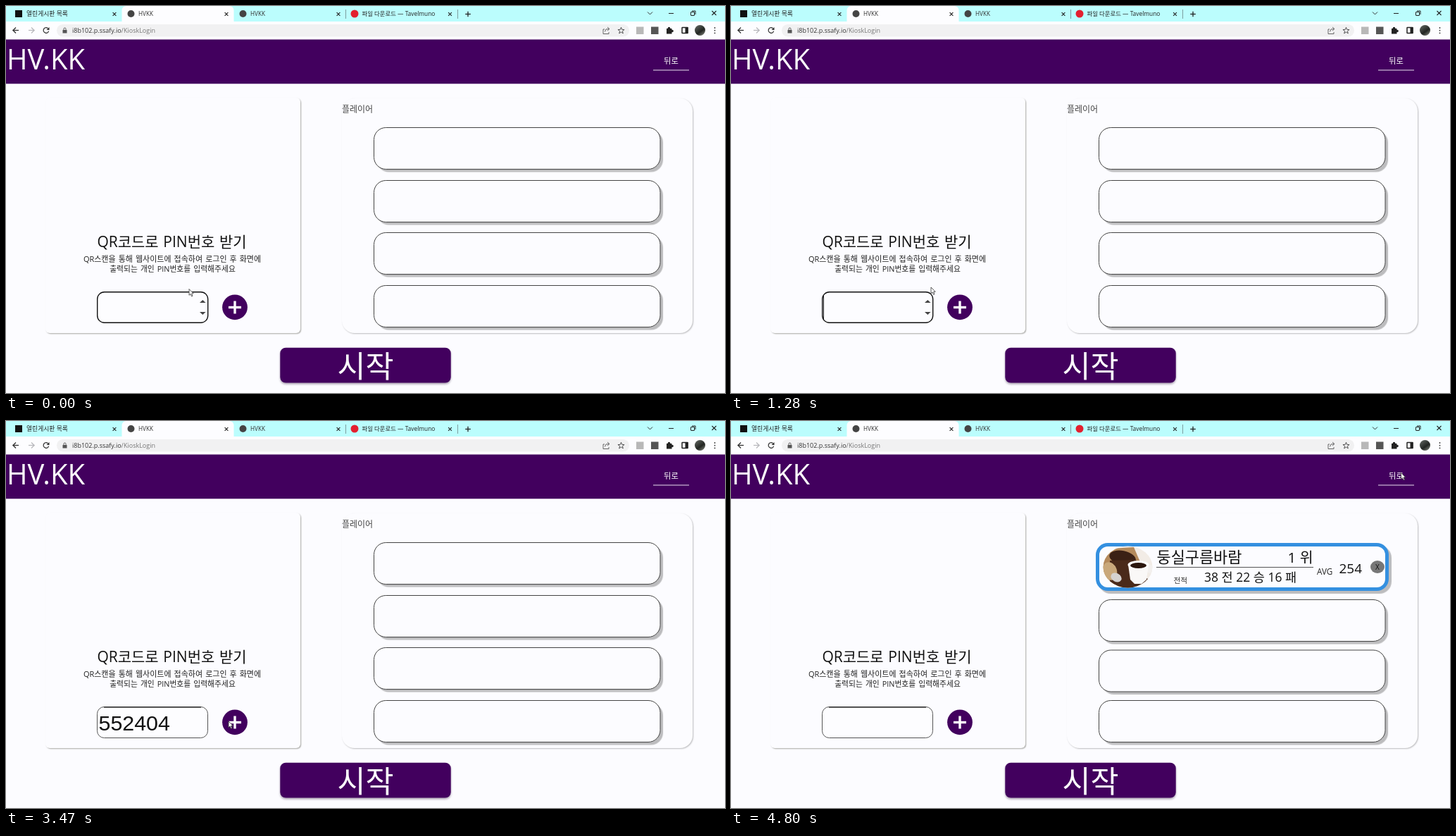
Recreate the animation shown at these times as an HTML page with a canvas. Size 1021 by 549 pixels, loop 4920 ms.

```html
<!DOCTYPE html>
<html lang="ko">
<head>
<meta charset="utf-8">
<title>Kiosk login</title>
<style>
html, body { margin: 0; width: 100%; height: 100%; overflow: hidden; background: #fcfcff; }
canvas { display: block; }
</style>
</head>
<body>
<canvas id="stage" width="1021" height="549"></canvas>
<script>
const ctx = document.getElementById('stage').getContext('2d');
const LOOP = 4920;
const SANS = '"Open Sans", "Noto Sans CJK KR", "Noto Sans CJK", sans-serif';
const PAGE = '#fcfcff', PURPLE = '#42005e', INK = '#111';

const PIN = '552404';
const TYPE_START = 2300, TYPE_STEP = 120;
const PRESS = 3420, ADDED = 3610;
const BLINK = 530, BLINK_START = 70;

// pointer path: time, x, y
const PATH = [
  [0, 260, 401.5], [120, 260, 403], [460, 261.5, 449], [700, 262, 449],
  [1240, 284, 399], [1330, 284, 399], [1830, 126.5, 419.5], [2960, 126.5, 419.5],
  [3380, 316, 426], [3690, 316, 426], [4170, 980, 79.5], [4330, 980, 79.5],
  [4760, 951.5, 73.5], [LOOP, 951.5, 73.5]
];

function rect(x, y, w, h, color) {
  ctx.fillStyle = color;
  ctx.fillRect(x, y, w, h);
}

function box(x, y, w, h, r, fill, stroke, width = 1) {
  ctx.beginPath();
  ctx.roundRect(x, y, w, h, r);
  if (fill) { ctx.fillStyle = fill; ctx.fill(); }
  if (stroke) { ctx.strokeStyle = stroke; ctx.lineWidth = width; ctx.stroke(); }
}

function oval(x, y, rx, ry, color, turn = 0) {
  ctx.beginPath();
  ctx.ellipse(x, y, rx, ry, turn, 0, Math.PI * 2);
  ctx.fillStyle = color;
  ctx.fill();
}

function line(points, color, width = 1) {
  ctx.beginPath();
  for (let i = 0; i < points.length; i += 2) ctx.lineTo(points[i], points[i + 1]);
  ctx.strokeStyle = color;
  ctx.lineWidth = width;
  ctx.stroke();
}

function poly(points, color) {
  ctx.beginPath();
  for (let i = 0; i < points.length; i += 2) ctx.lineTo(points[i], points[i + 1]);
  ctx.closePath();
  ctx.fillStyle = color;
  ctx.fill();
}

function text(str, x, y, size, color = INK, align = 'left', family = SANS) {
  ctx.font = size + 'px ' + family;
  ctx.textAlign = align;
  ctx.fillStyle = color;
  ctx.fillText(str, x, y);
}

function shadow(color, dx, dy, blur, draw) {
  ctx.save();
  ctx.shadowColor = color;
  ctx.shadowOffsetX = dx;
  ctx.shadowOffsetY = dy;
  ctx.shadowBlur = blur;
  draw();
  ctx.restore();
}

function cross(x, y, r, color, width = 1.1) {
  line([x - r, y - r, x + r, y + r], color, width);
  line([x - r, y + r, x + r, y - r], color, width);
}

function plus(x, y, r, color, width) {
  line([x - r, y, x + r, y], color, width);
  line([x, y - r, x, y + r], color, width);
}

function tabs() {
  rect(0, 0, 1021, 22, '#bbfdfd');
  box(164.5, 0, 159, 24, [6, 6, 0, 0], '#fdfdff');
  rect(13, 6, 10, 10, '#111');
  oval(177.5, 11, 5, 5, '#444');
  oval(336.5, 11, 5, 5, '#444');
  oval(495, 11, 5.5, 5.5, '#e3202f');
  text('열린게시판 목록', 29, 14, 8.8, '#222');
  text('HVKK', 188, 14, 8.2, '#333');
  text('HVKK', 347, 14, 8.2, '#333');
  text('파일 다운로드 — Tavelmuno', 505.5, 14, 8.4, '#222');
  for (const x of [154, 313, 472, 630.5]) cross(x, 11.5, 2.4, '#222');
  for (const x of [482.5, 641.5]) line([x, 5, x, 18], '#7c9d9f');
  plus(656, 11.5, 3.8, '#222', 1.3);

  line([911, 8.5, 914.5, 12, 918, 8.5], '#333');
  line([941, 10.5, 948, 10.5], '#222');
  box(972.5, 8.5, 5, 5, 0.5, null, '#222');
  line([974, 7, 979, 7, 979, 12], '#222');
  cross(1005.5, 10, 3, '#222');
}

function arrow(x, dir, color) {
  line([x - 4.5 * dir, 34.5, x + 4 * dir, 34.5], color, 1.3);
  line([x, 30.5, x - 4 * dir, 34.5, x, 38.5], color, 1.3);
}

function toolbar() {
  rect(0, 22, 1021, 26, '#fdfdff');
  box(72, 26, 813, 17.5, 8.7, '#f1f1f2');
  arrow(14, 1, '#333');
  arrow(36, -1, '#b9b9bd');
  ctx.beginPath();
  ctx.arc(57, 34.5, 3.8, 0.3, 5.5);
  ctx.strokeStyle = '#333';
  ctx.lineWidth = 1.3;
  ctx.stroke();
  poly([61.5, 30, 61.5, 34, 57.5, 34], '#333');

  rect(80.5, 34, 6, 4.5, '#555');
  box(82, 31, 3, 4, 1.5, null, '#555');
  text('i8b102.p.ssafy.io', 94, 38, 9, '#333');
  const host = ctx.measureText('i8b102.p.ssafy.io').width;
  text('/KioskLogin', 94 + host, 38, 9, '#777');

  line([850, 33, 848, 33, 848, 39.5, 856, 39.5, 856, 37], '#666');
  line([850.5, 36.5, 852, 33, 856.5, 32.5], '#666');
  line([854, 30, 857, 32.5, 854, 35], '#666');

  const star = [];
  for (let i = 0; i <= 10; i++) {
    const r = i % 2 ? 2 : 4.8, a = i * Math.PI / 5 - Math.PI / 2;
    star.push(873.5 + r * Math.cos(a), 35 + r * Math.sin(a));
  }
  line(star, '#444', 0.9);

  rect(895, 29.5, 10.5, 10.5, '#b8b8b8');
  rect(916, 29.5, 10.5, 10.5, '#555');
  rect(938, 32, 7.5, 7.5, '#222');
  oval(941.5, 31.5, 1.8, 1.8, '#222');
  oval(946, 35.5, 1.8, 1.8, '#222');
  box(960, 30.5, 8, 8, 0.5, null, '#222', 1.5);
  rect(964.5, 30, 4, 9, '#222');
  const g = ctx.createLinearGradient(980, 28, 990, 42);
  g.addColorStop(0, '#5c605c');
  g.addColorStop(0.6, '#222522');
  g.addColorStop(1, '#777b72');
  oval(985.5, 34.5, 7.5, 7.5, g);
  for (const y of [31, 34.7, 38.4]) oval(1006.5, y, 0.9, 0.9, '#333');
}

function header() {
  rect(0, 47.5, 1021, 62.8, PURPLE);
  text('HV.KK', 1, 90, 40, '#fff');
  text('뒤로', 944.5, 82, 11.3, '#fff', 'center');
  line([919, 91, 970, 91], '#e8e0ee');
}

function panels() {
  shadow('rgba(110,110,100,.5)', 1.2, 1.2, 1.5, () => box(56, 130, 362, 334, 6, PAGE));
  shadow('rgba(110,110,110,.45)', 1, 1, 2, () => box(477, 131, 498, 333, 18, PAGE));
  ctx.save();
  ctx.wordSpacing = '1.2px';
  text('QR코드로 PIN번호 받기', 235.5, 342, 21, INK, 'center');
  text('QR스캔을 통해 웹사이트에 접속하여 로그인 후 화면에', 236, 363, 11, '#222', 'center');
  text('출력되는 개인 PIN번호를 입력해주세요', 236.5, 377, 10.8, '#222', 'center');
  ctx.restore();
  text('플레이어', 477, 150.5, 12, '#444');
}

function pinField(t) {
  const focused = t < PRESS;
  if (focused) {
    box(129.7, 405.7, 157, 43.6, 10, '#fdfdff', '#111', 1.4);
    poly([275, 421, 279.3, 417, 283.6, 421], '#444');
    poly([275, 434, 279.3, 438, 283.6, 434], '#444');
  } else {
    box(129.5, 405.5, 157, 44, 10, '#fdfdff', '#555', 1);
    line([139, 406, 277, 406], '#333', 1.3);
  }
  const typing = t >= TYPE_START && t < ADDED;
  const count = typing ? Math.min(PIN.length, 1 + Math.floor((t - TYPE_START) / TYPE_STEP)) : 0;
  const shown = PIN.slice(0, count);
  text(shown, 131.5, 438.5, 30.4, '#111', 'left', '"Liberation Sans", Arial, sans-serif');
  const caretOn = t >= BLINK_START && Math.floor((t - BLINK_START) / BLINK) % 2 === 0;
  if (focused && caretOn) {
    const x = 131.5 + ctx.measureText(shown).width;
    line([x, 410, x, 445], '#222');
  }
  oval(325, 427.3, 17.9, 17.9, PURPLE);
  plus(325, 427.5, 9, '#fff', 3.4);
}

function slot(y) {
  shadow('rgba(110,110,110,.45)', 4, 4, 1, () => box(522.5, y, 406.5, 59, 17, PAGE));
  box(522.5, y, 406.5, 59, 17, PAGE, '#444', 1);
}

function coffee() {
  ctx.save();
  ctx.beginPath();
  ctx.ellipse(563.5, 207, 35, 29.5, 0, 0, Math.PI * 2);
  ctx.clip();
  rect(528, 177, 72, 60, '#f2ece6');
  poly([528, 198, 540, 181, 572, 179, 581, 200, 570, 238, 528, 238], '#b48a5c');
  oval(556, 194, 19, 10, '#3b2115', 0.2);
  poly([538, 198, 575, 197, 584, 220, 602, 229, 598, 240, 538, 240], '#4a2a1a');
  oval(538, 213, 10, 13, '#c9a87b', -0.3);
  oval(547, 222, 8, 6, '#d5d2d0', 0.5);
  oval(595, 210, 5, 6, '#f3f0ee');
  poly([564, 204, 593, 204, 590, 225, 583, 231, 573, 231, 567, 225], '#faf8f7');
  oval(578.5, 204, 15, 6, '#fff');
  oval(578.5, 205, 11.5, 4, '#2b160d');
  ctx.restore();
}

function playerCard() {
  shadow('rgba(110,110,110,.45)', 4, 4, 1, () => box(518, 173, 416, 68, 17, '#3490e0'));
  box(523, 178, 406, 58, 12, PAGE);
  coffee();
  text('둥실구름바람', 604.5, 200.5, 21.9);
  text('1 위', 826.5, 200.5, 20.5, INK, 'right');
  line([604, 207.5, 827, 207.5], '#555');
  text('전적', 628.5, 230, 10.7, '#333');
  text('38 전 22 승 16 패', 672, 227.5, 17.5);
  text('AVG', 832, 217.5, 11.7, '#222');
  text('254', 863.5, 215.5, 19);
  oval(918, 207, 10, 9, '#777');
  text('X', 918, 210.8, 10, '#111', 'center');
}

function players(added) {
  const tops = added ? [253.5, 325, 396.5] : [172.5, 247.5, 321.5, 396.5];
  for (const y of tops) slot(y);
  if (added) playerCard();
}

function startButton() {
  shadow('rgba(90,70,100,.5)', 0, 2, 3, () => box(389.3, 484.7, 242.4, 49.8, 8, PURPLE));
  text('시작', 510.5, 527, 43.5, '#fff', 'center');
}

function pointer(t) {
  let i = 1;
  while (i < PATH.length - 1 && t >= PATH[i][0]) i++;
  const [t0, x0, y0] = PATH[i - 1], [t1, x1, y1] = PATH[i];
  const k = (t - t0) / (t1 - t0), e = k * k * (3 - 2 * k);
  ctx.save();
  ctx.translate(x0 + (x1 - x0) * e, y0 + (y1 - y0) * e);
  const shape = [0, 0, 0, 8.8, 2, 7, 3.6, 10.4, 5, 9.8, 3.6, 6.5, 6.2, 6.3, 0, 0];
  poly(shape, '#fff');
  line(shape, '#333', 0.8);
  ctx.restore();
}

function frame(now) {
  const t = now % LOOP;
  rect(0, 0, 1021, 549, PAGE);
  tabs();
  toolbar();
  header();
  panels();
  pinField(t);
  players(t >= ADDED);
  startButton();
  pointer(t);
}

const begin = performance.now();
function tick() {
  frame(performance.now() - begin);
  requestAnimationFrame(tick);
}
tick();
</script>
</body>
</html>
```
